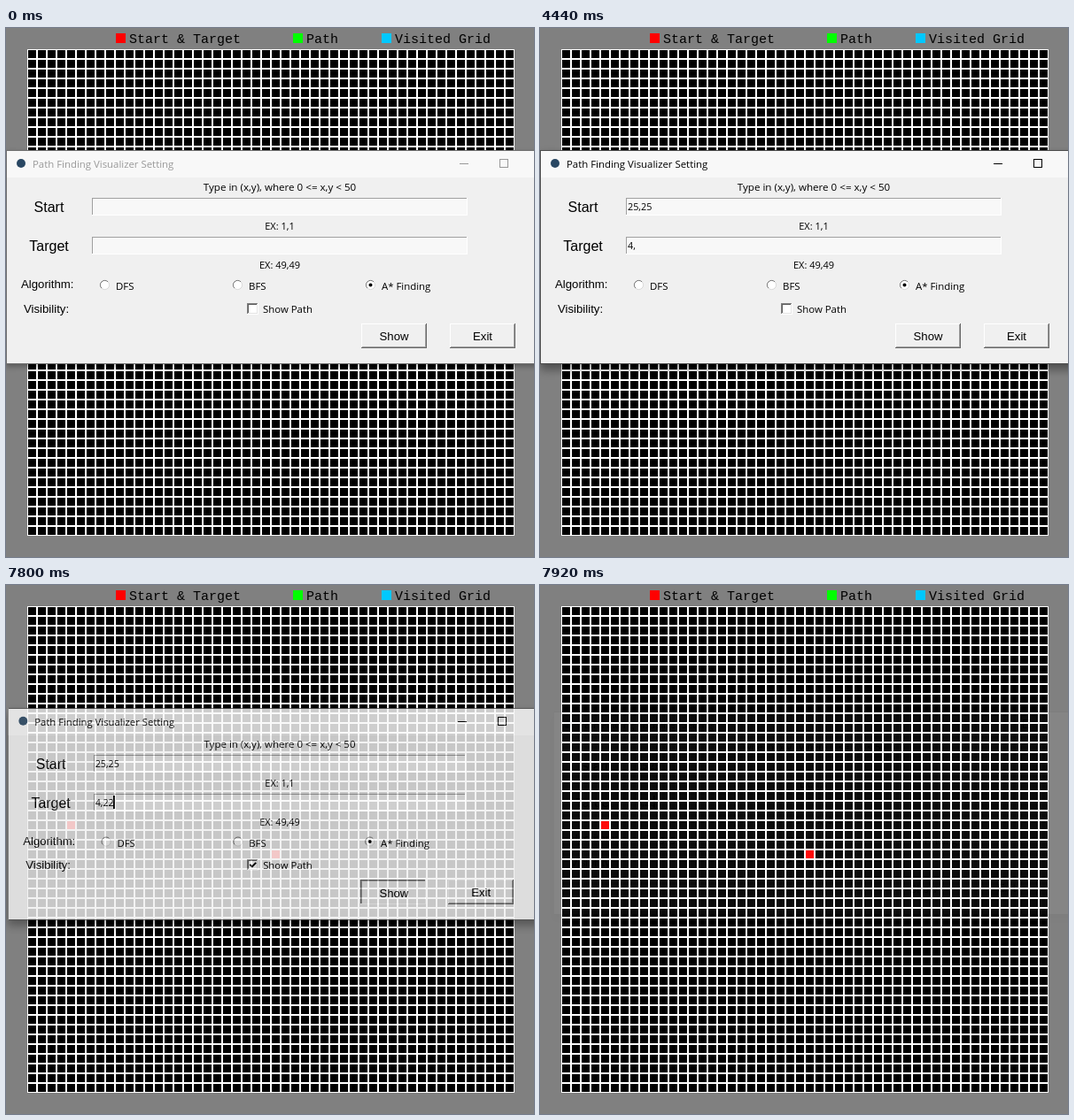
An HTML page that plays this animation: 596 by 598 pixels, repeating every 8 s.

```html
<!DOCTYPE html>
<html lang="en">
<head>
<meta charset="utf-8">
<title>Path finding settings</title>
<style>
  html, body { margin: 0; width: 100%; height: 100%; overflow: hidden; background: #808080; }
  #stage { position: relative; width: 596px; height: 598px; overflow: hidden; background: #808080; }
  svg { position: absolute; left: 0; top: 0; display: block; }
  rect, line { shape-rendering: crispEdges; }
  text { white-space: pre; fill: #000; }
  .legend { font: 15px "Liberation Mono", monospace; }
  .ui { font: 11.4px "Open Sans", sans-serif; }
  .hint { font: 11.6px "Open Sans", sans-serif; }
  .example { font: 11px "Open Sans", sans-serif; }
  .entry { font: 10.8px "Open Sans", sans-serif; }
  .head { font: 16px "Liberation Sans", sans-serif; }
  .label { font: 13.2px "Liberation Sans", sans-serif; }
  .mid { text-anchor: middle; }
  #win {
    position: absolute; left: 0; top: 138px; width: 618px; height: 242px;
    transform-origin: 309px 102px;
    box-shadow: 0 6px 10px rgba(0, 0, 0, .4);
  }
  #win.idle { box-shadow: 0 3px 6px rgba(0, 0, 0, .3); }
  #frame { fill: none; stroke: #4c4c4c; }
  #controls { fill: none; stroke: #000; }
  .idle #frame { stroke: #707070; }
  .idle #controls { stroke: #999; }
  .idle #title { fill: #999; }
</style>
</head>
<body>
<div id="stage">
  <svg width="596" height="598">
    <defs>
      <pattern id="cell" x="24" y="24" width="11" height="11" patternUnits="userSpaceOnUse">
        <rect width="11" height="11" fill="#fff"/>
        <rect x="1" y="1" width="9" height="9"/>
      </pattern>
    </defs>
    <rect x="24" y="24" width="550" height="550" fill="url(#cell)"/>
    <g id="marks" fill="#f00"></g>
    <g id="legend"></g>
  </svg>
  <div id="win">
    <svg width="618" height="242" viewBox="0 138 618 242">
      <rect y="138" width="618" height="242" fill="#f0f0f0"/>
      <rect y="138" width="618" height="31" fill="#f8f8f8"/>
      <rect id="frame" x=".5" y="138.5" width="617" height="241"/>
      <circle cx="17" cy="153" r="5" fill="#294763"/>
      <g id="controls">
        <line x1="512" y1="153.5" x2="522" y2="153.5"/>
        <rect x="557.5" y="148.5" width="9" height="9"/>
      </g>
      <g id="body"></g>
    </svg>
  </div>
</div>
<script>
const LOOP = 8000;
const $ = id => document.getElementById(id);

function add(parent, tag, attrs, text = '') {
  const el = document.createElementNS('http://www.w3.org/2000/svg', tag);
  for (const key in attrs) el.setAttribute(key, attrs[key]);
  el.textContent = text;
  return parent.appendChild(el);
}
const body = $('body');
const label = (cls, x, y, text, parent = body) => add(parent, 'text', { class: cls, x, y }, text);
const box = (x, y, width, height, fill, parent = body) => add(parent, 'rect', { x, y, width, height, fill });

// Bevelled box: top/left edge in one colour, bottom/right in another.
function bevel(x, y, w, h, light, dark, fill, parent = body) {
  box(x, y, w, h, dark, parent);
  box(x, y, w - 1, h - 1, light, parent);
  box(x + 1, y + 1, w - 2, h - 2, fill, parent);
}

// Legend above the grid
[[124, '#f00', 'Start & Target'], [324, '#0f0', 'Path'], [424, '#00c8ff', 'Visited Grid']]
  .forEach(([x, color, text]) => {
    box(x, 6, 11, 11, color, $('legend'));
    label('legend', x + 15, 17, text, $('legend'));
  });

// Start and target cells
[[4, 22], [25, 25]].forEach(([col, row]) =>
  box(25 + 11 * col, 25 + 11 * row, 9, 9, '#f00', $('marks')));

label('ui', 30, 158, 'Path Finding Visualizer Setting').id = 'title';
label('hint mid', 309, 184, 'Type in (x,y), where 0 <= x,y < 50');

const fields = [['Start', 'EX: 1,1', 192], ['Target', 'EX: 49,49', 236]].map(([name, example, y]) => {
  label('head mid', 48.5, y + 16, name);
  bevel(97, y, 424, 20, '#a0a0a0', '#fff', '#f8f8f8');
  label('example mid', 309, y + 36, example);
  return { text: label('entry', 99, y + 14, ''), caret: box(98, y + 2, 2, 15, '#000') };
});

label('label', 17, 294, 'Algorithm:');
label('label', 20, 322, 'Visibility:');

['DFS', 'BFS', 'A* Finding'].forEach((name, i) => {
  const x = 111.5 + 150 * i, y = 290.5;
  const arc = (sweep, stroke) => add(body, 'path', {
    d: `M${x - 3.6} ${y + 3.6}A5 5 0 0 ${sweep} ${x + 3.6} ${y - 3.6}`, fill: 'none', stroke
  });
  add(body, 'circle', { cx: x, cy: y, r: 5, fill: '#fff' });
  arc(1, '#707070');
  arc(0, '#d8d8d8');
  if (i === 2) add(body, 'circle', { cx: x, cy: y, r: 2 });
  label('ui', x + 12.5, 296, name);
});

bevel(272, 311, 13, 13, '#808080', '#fff', '#e3e3e3');
bevel(273, 312, 11, 11, '#606060', '#e3e3e3', '#fff');
const tick = add(body, 'path', { d: 'M275 316.5L277.5 319L282 314.5', fill: 'none', stroke: '#000', 'stroke-width': 2 });
label('ui', 290, 322, 'Show Path');

function button(x, name, pressed) {
  const g = add(body, 'g', {});
  const shift = pressed ? 1 : 0;
  if (pressed) {
    bevel(x, 334, 74, 28, '#696969', '#fff', '#a0a0a0', g);
    box(x + 2, 336, 71, 25, '#f0f0f0', g);
  } else {
    bevel(x, 334, 74, 28, '#fff', '#696969', '#a0a0a0', g);
    box(x + 1, 335, 71, 25, '#f0f0f0', g);
  }
  label('label mid', x + 37 + shift, 353 + shift, name, g);
  return g;
}
const showUp = button(401, 'Show', false);
const showDown = button(401, 'Show', true);
button(501, 'Exit', false);

// Each step changes part of the state; caret is a field index, or -1 when off.
const steps = [
  [0, { active: false, start: '', target: '', caret: -1, checked: false, pressed: false, alpha: 1, scale: 1 }],
  [540, { active: true, caret: 0 }],
  [1110, { caret: -1 }],
  [1260, { start: '2' }],
  [1320, { start: '25' }],
  [1410, { caret: 0 }],
  [1440, { start: '25,' }],
  [1590, { start: '25,2' }],
  [1650, { start: '25,25' }],
  [1980, { caret: -1 }],
  [2130, { caret: 1 }],
  [2700, { caret: -1 }],
  [3000, { caret: 1 }],
  [3390, { target: '4' }],
  [3540, { caret: -1 }],
  [3570, { target: '4,' }],
  [3840, { caret: 1 }],
  [4440, { caret: -1 }],
  [4710, { caret: 1 }],
  [5160, { target: '4,2' }],
  [5310, { caret: -1 }],
  [5580, { caret: 1 }],
  [5640, { target: '4,22' }],
  [6150, { caret: -1 }],
  [6450, { caret: 1 }],
  [7020, { caret: -1 }],
  [7140, { checked: true }],
  [7320, { caret: 1 }],
  [7680, { pressed: true }],
  [7770, { alpha: .96, scale: .997 }],
  [7800, { alpha: .83, scale: .992 }],
  [7830, { alpha: .58, scale: .981 }],
  [7860, { alpha: .29, scale: .968 }],
  [7890, { alpha: .13, scale: .959 }],
  [7920, { alpha: .045, scale: .951 }]
];

const show = (el, on) => { el.style.display = on ? '' : 'none'; };
const textWidth = s => [...s].reduce((sum, c) => sum + (c === ',' ? 3 : 6), 0);

function render(t) {
  const s = Object.assign({}, ...steps.filter(([at]) => at <= t).map(([, change]) => change));
  const win = $('win');
  win.className = s.active ? '' : 'idle';
  win.style.opacity = s.alpha;
  win.style.transform = s.scale < 1 ? `scale(${s.scale})` : 'none';
  [s.start, s.target].forEach((value, i) => {
    const { text, caret } = fields[i];
    text.textContent = value;
    caret.setAttribute('x', 98 + textWidth(value));
    show(caret, s.caret === i);
  });
  show(tick, s.checked);
  show(showUp, !s.pressed);
  show(showDown, s.pressed);
  show($('marks'), s.pressed);
}

const begin = performance.now();
function loop() {
  render((performance.now() - begin) % LOOP);
  requestAnimationFrame(loop);
}
loop();
</script>
</body>
</html>
```
